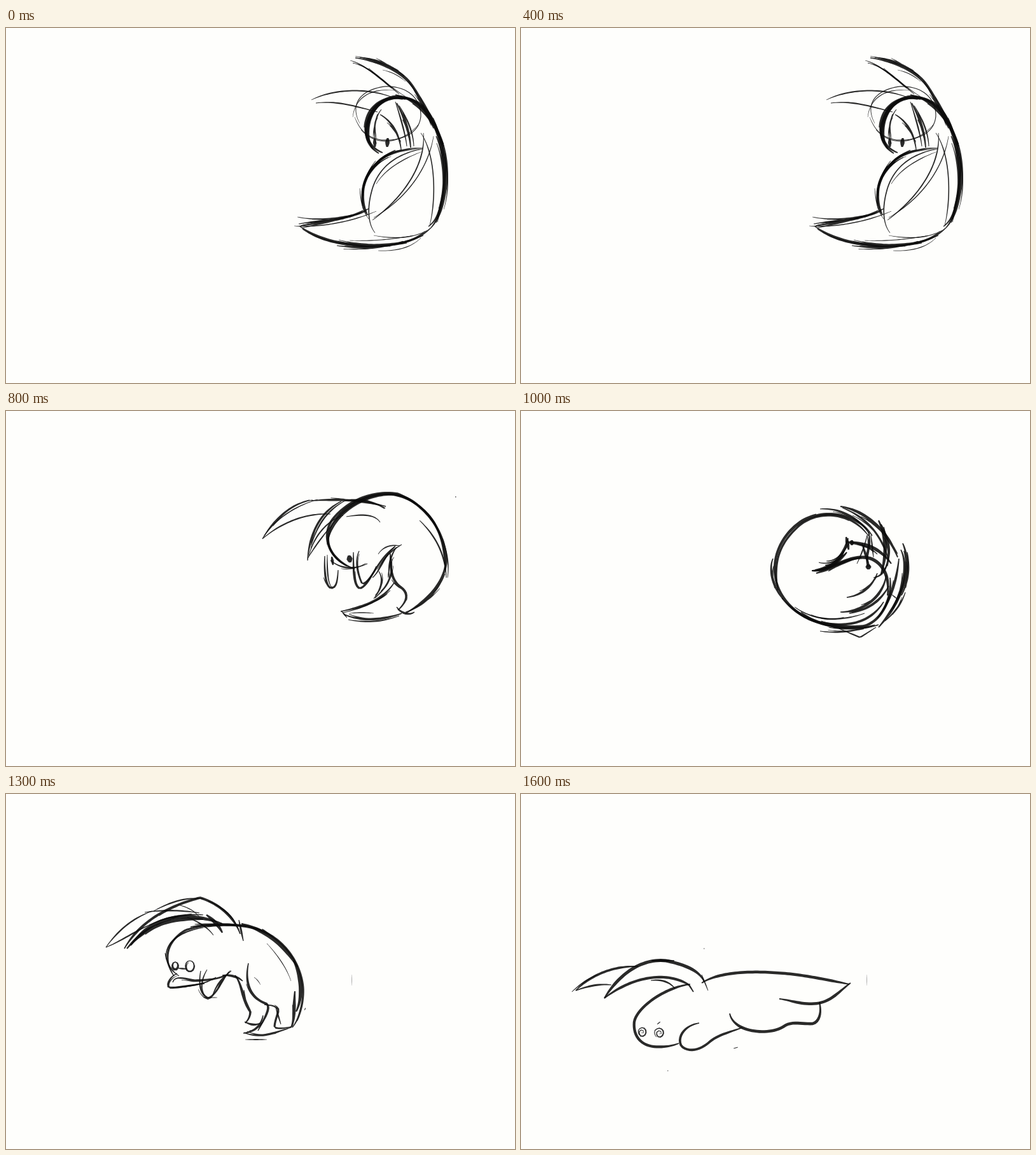
An HTML page for the animation above (2.1 s loop, 800x558 px).

```html
<!DOCTYPE html>
<html lang="en">
<head>
<meta charset="utf-8">
<title>Tumble sketch</title>
<style>
  html, body { margin: 0; height: 100%; overflow: hidden; background: #fefefc; }
  svg { display: block; width: 100%; height: 100%; }
  path { fill: #0b0b0b; fill-opacity: .87; }
</style>
</head>
<body>
<svg viewBox="0 0 800 558" preserveAspectRatio="none">
  <g id="stand" data-echoes="2">
    <!-- ears -->
    <path d="M549 47C575 50 612 62 634 86C650 105 670 140 687 182" stroke-width="2.8"/>
    <path d="M556 46C580 48 606 58 626 76" stroke-width="2.4"/>
    <path d="M541 51C560 56 580 72 606 95" stroke-width="1.6"/>
    <path d="M545 55C570 60 592 82 618 104" stroke-width="1.8"/>
    <path d="M592 66Q612 70 628 84" stroke-width="1"/>
    <path d="M570 63Q600 90 628 108" stroke-width="1.2"/>
    <path d="M632 83C650 108 662 138 672 158" stroke-width="2.2"/>
    <path d="M480 113C510 98 560 92 605 108" stroke-width="1.8"/>
    <path d="M487 118C520 114 545 122 584 132" stroke-width="1.8"/>
    <!-- head -->
    <path d="M592 196C566 186 560 160 570 136C580 114 604 106 628 112" stroke-width="3.8"/>
    <path d="M586 197C560 182 562 150 578 128C596 106 632 102 656 124C672 140 680 165 684 184" stroke-width="3.6"/>
    <path d="M576 190C560 160 574 116 610 108C640 106 662 126 676 160" stroke-width="3.2"/>
    <path d="M612 105C650 112 674 150 688 186" stroke-width="3.2"/>
    <path d="M556 150C540 120 556 98 594 92C630 90 652 110 652 138C650 166 622 178 590 176C566 172 556 160 548 140" stroke-width="1"/>
    <path d="M545 140C548 112 570 94 610 98" stroke-width="1"/>
    <path d="M558 160C580 186 620 184 648 152" stroke-width="1"/>
    <path d="M582 182C576 160 580 140 590 128" stroke-width="2.1"/>
    <path d="M588 136C606 146 618 166 621 191" stroke-width="2.8"/>
    <path d="M614 118C624 136 634 160 636 188" stroke-width="3.6"/>
    <path d="M618 122C632 145 640 165 641 186" stroke-width="2"/>
    <path d="M612 116C620 140 628 168 630 186" stroke-width="2"/>
    <path d="M600 173L599 187" stroke-width="6"/>
    <path d="M579 174L580 187" stroke-width="4.6"/>
    <!-- body -->
    <path d="M655 189C620 188 590 200 572 224C558 244 556 270 566 292" stroke-width="2.2"/>
    <path d="M622 192C592 196 568 222 562 250C558 272 566 288 568 294" stroke-width="3.4"/>
    <path d="M612 192C580 206 560 236 560 268" stroke-width="2.8"/>
    <path d="M556 252Q558 285 570 300" stroke-width="1.2"/>
    <path d="M655 190C620 196 588 214 576 252C566 285 570 310 580 322" stroke-width="1.5"/>
    <path d="M652 195Q600 215 582 245" stroke-width="1.2"/>
    <path d="M656 165C660 210 630 262 576 302" stroke-width="1.6"/>
    <path d="M672 170C664 220 630 268 578 298" stroke-width="1.2"/>
    <path d="M656 128C690 165 698 220 690 258C686 282 680 300 668 314" stroke-width="3.4"/>
    <path d="M664 135C688 180 696 230 684 275C680 296 672 306 664 312" stroke-width="3"/>
    <path d="M676 170C690 200 694 250 676 306" stroke-width="2.8"/>
    <path d="M652 165C676 200 676 270 666 310" stroke-width="1.4"/>
    <path d="M684 190C698 220 696 260 688 285" stroke-width="1.2"/>
    <!-- tail -->
    <path d="M458 297Q500 306 560 290" stroke-width="1.5"/>
    <path d="M463 311C500 305 540 300 570 284" stroke-width="3"/>
    <path d="M460 308C490 302 535 302 566 288" stroke-width="2.2"/>
    <path d="M453 311C490 314 540 306 582 288" stroke-width="1.3"/>
    <path d="M461 311C500 340 560 346 620 338C640 334 655 326 668 314" stroke-width="3"/>
    <path d="M466 316C500 340 560 350 630 338" stroke-width="2.1"/>
    <path d="M520 342C560 348 610 346 656 326" stroke-width="2.4"/>
    <path d="M540 334Q590 336 640 326" stroke-width="1"/>
    <path d="M585 350Q630 352 652 330" stroke-width="1"/>
    <path d="M578 326Q630 336 662 318" stroke-width="1.2"/>
  </g>

  <g id="tuck" data-echoes="1">
    <!-- ears -->
    <path d="M403 201C420 172 448 144 482 140" stroke-width="2.4"/>
    <path d="M403 201C432 176 470 160 510 162" stroke-width="1.9"/>
    <path d="M406 196Q435 155 490 139" stroke-width="1.4"/>
    <path d="M480 141C520 138 560 140 597 150" stroke-width="3"/>
    <path d="M535 140C560 138 580 144 596 153" stroke-width="3"/>
    <path d="M474 235C476 200 490 160 527 142" stroke-width="2.8"/>
    <path d="M476 228C484 195 506 172 530 164" stroke-width="1.8"/>
    <path d="M480 210C490 178 505 155 535 140" stroke-width="2"/>
    <path d="M474 232Q490 205 512 180" stroke-width="1.8"/>
    <path d="M535 166C560 162 580 162 588 175" stroke-width="1.9"/>
    <!-- head and back -->
    <path d="M548 248C510 236 494 200 512 172C540 135 585 125 615 130C655 145 690 185 692 235C690 270 660 300 628 318" stroke-width="3.2"/>
    <path d="M536 244C500 224 498 190 524 164C560 130 610 118 645 146C676 170 690 200 690 250" stroke-width="2.8"/>
    <path d="M505 210C510 160 570 128 610 132C650 140 676 170 684 200" stroke-width="2.4"/>
    <path d="M650 172Q690 210 692 262" stroke-width="2"/>
    <path d="M686 200Q698 235 694 262" stroke-width="1.5"/>
    <path d="M690 256C676 290 650 310 628 316" stroke-width="2.2"/>
    <path d="M539 227L541 238" stroke-width="8"/>
    <path d="M512 229L514 242" stroke-width="4"/>
    <path d="M510 235Q535 255 568 240" stroke-width="2.2"/>
    <!-- limbs -->
    <path d="M501 228C500 250 502 275 510 278C520 280 521 265 522 250" stroke-width="2.8"/>
    <path d="M505 226Q504 270 512 277" stroke-width="1.8"/>
    <path d="M546 222C546 250 546 275 556 279C566 276 576 258 582 244" stroke-width="2.8"/>
    <path d="M555 220C548 235 552 255 560 272C575 268 585 232 610 214" stroke-width="2.4"/>
    <path d="M576 262C588 252 592 230 612 212" stroke-width="2.4"/>
    <path d="M590 240Q600 222 622 210" stroke-width="2"/>
    <path d="M585 225Q596 208 620 212" stroke-width="1.6"/>
    <path d="M586 252C594 265 590 280 578 295" stroke-width="2.4"/>
    <path d="M604 224C604 250 606 268 622 278C634 288 630 300 616 313" stroke-width="3.4"/>
    <path d="M606 232C608 262 600 275 580 294" stroke-width="2.4"/>
    <path d="M614 214Q600 232 602 262" stroke-width="2.4"/>
    <path d="M614 308C620 318 634 322 642 316" stroke-width="3"/>
    <!-- tail -->
    <path d="M610 270C590 300 560 308 526 315" stroke-width="3"/>
    <path d="M604 282Q580 305 530 317" stroke-width="1.8"/>
    <path d="M527 314L536 325" stroke-width="1.8"/>
    <path d="M532 320C555 330 590 330 622 318" stroke-width="3.2"/>
    <path d="M538 328Q580 336 618 322" stroke-width="2"/>
    <path d="M540 318Q560 316 578 318" stroke-width="1.4"/>
    <path d="M706 135h1.5" stroke-width="1.5"/>
  </g>

  <g id="ball" data-echoes="1">
    <!-- outline -->
    <path d="M552 196C530 162 480 152 444 172C408 194 394 232 400 262C404 290 428 318 460 330C500 340 545 340 570 300" stroke-width="3.2"/>
    <path d="M546 196C520 160 474 154 440 178C404 208 396 240 404 282" stroke-width="2.8"/>
    <path d="M396 232C388 250 398 280 412 296" stroke-width="3.4"/>
    <path d="M410 294C440 330 490 346 540 338C570 328 584 290 580 262" stroke-width="3.5"/>
    <path d="M440 316C470 340 520 348 562 336" stroke-width="3.4"/>
    <path d="M430 308C460 330 500 332 540 318" stroke-width="1.8"/>
    <path d="M456 320Q480 332 508 324" stroke-width="1.6"/>
    <path d="M470 346Q510 352 556 336" stroke-width="2.1"/>
    <path d="M500 342L533 356L558 340" stroke-width="2"/>
    <path d="M470 154C500 152 530 166 548 194" stroke-width="2.6"/>
    <path d="M502 150C540 156 575 186 592 230" stroke-width="4"/>
    <path d="M505 152C540 166 565 190 578 235" stroke-width="2.6"/>
    <path d="M562 172C575 200 575 225 566 256" stroke-width="4.8"/>
    <path d="M566 178C582 210 580 230 572 250" stroke-width="3.6"/>
    <path d="M600 208C614 240 606 290 562 340" stroke-width="4"/>
    <path d="M597 218C608 240 604 280 580 316" stroke-width="3.6"/>
    <path d="M607 222C612 250 606 275 598 290" stroke-width="3"/>
    <path d="M594 232C590 270 580 300 560 326" stroke-width="3.4"/>
    <path d="M604 285Q596 310 572 330" stroke-width="2.4"/>
    <!-- folds -->
    <path d="M512 293C535 290 552 276 560 255" stroke-width="3.2"/>
    <path d="M502 316C540 316 570 290 574 258" stroke-width="3.6"/>
    <path d="M516 318Q560 310 578 275" stroke-width="3.4"/>
    <path d="M582 288l10 8" stroke-width="1.4"/>
    <path d="M457 251C485 252 505 235 514 200" stroke-width="4.6"/>
    <path d="M458 251C485 252 520 222 550 232C570 240 580 262 576 290" stroke-width="4.4"/>
    <path d="M464 255C490 248 505 235 535 230" stroke-width="4.4"/>
    <path d="M462 250C484 246 500 238 512 222" stroke-width="4.4"/>
    <path d="M468 238Q490 244 512 222" stroke-width="2"/>
    <path d="M480 236Q502 236 516 206" stroke-width="2.2"/>
    <path d="M511 198L515 218" stroke-width="5"/>
    <path d="M512 206C540 206 565 216 582 240" stroke-width="4.4"/>
    <path d="M516 208Q545 210 560 225" stroke-width="2.4"/>
    <path d="M546 190C552 210 540 225 545 246" stroke-width="3.4"/>
    <path d="M536 208L548 246" stroke-width="3.4"/>
    <path d="M546 241v8" stroke-width="8"/>
    <path d="M520 203v8" stroke-width="6"/>
    <path d="M550 195L554 230" stroke-width="2"/>
    <path d="M528 240Q540 215 544 195" stroke-width="1.8"/>
    <path d="M554 262Q570 260 575 240" stroke-width="2.6"/>
  </g>

  <g id="leap" data-echoes="1">
    <!-- ears -->
    <path d="M157 241C172 220 195 196 230 184" stroke-width="2"/>
    <path d="M157 241C180 232 205 214 230 204" stroke-width="2"/>
    <path d="M186 243C205 210 240 180 305 163C335 172 360 195 368 220" stroke-width="3.4"/>
    <path d="M190 243C225 200 270 195 310 197" stroke-width="4.5"/>
    <path d="M196 238C230 192 280 182 340 204" stroke-width="4.5"/>
    <path d="M218 186Q260 180 304 187" stroke-width="2"/>
    <path d="M232 184Q275 160 310 165" stroke-width="2"/>
    <path d="M225 206C250 194 280 188 310 190" stroke-width="2.4"/>
    <path d="M318 168Q354 184 364 210" stroke-width="2"/>
    <path d="M270 174Q295 180 304 194" stroke-width="1.2"/>
    <path d="M315 190Q332 202 340 218" stroke-width="5"/>
    <path d="M285 194Q314 205 326 222" stroke-width="1.8"/>
    <path d="M366 198L373 231" stroke-width="2.6"/>
    <!-- head and back -->
    <path d="M264 286C246 260 252 232 282 214C320 202 370 202 400 214C440 230 464 268 467 305C468 330 460 355 450 367" stroke-width="2.8"/>
    <path d="M370 204C410 214 440 240 458 272" stroke-width="5.2"/>
    <path d="M452 262C470 300 462 330 456 342" stroke-width="5"/>
    <path d="M454 310C452 340 454 355 448 367" stroke-width="4.5"/>
    <path d="M410 235Q438 265 448 294" stroke-width="1"/>
    <path d="M252 260C248 236 270 216 310 210" stroke-width="2"/>
    <path d="M250 250Q254 275 272 286" stroke-width="2"/>
    <path d="M290 209Q330 202 378 208" stroke-width="3.4"/>
    <path d="M469 340l2-4" stroke-width="1"/>
    <path d="M266 264c-6 0-6 12 0 12s6-12 0-12" stroke-width="3.4"/>
    <path d="M289 262c-9 0-9 17 0 17s9-17 0-17" stroke-width="2.4"/>
    <path d="M271 274L284 275" stroke-width="2"/>
    <!-- arms -->
    <path d="M269 282C256 288 252 300 256 304C268 306 290 300 312 298" stroke-width="2.8"/>
    <path d="M262 296C265 285 280 290 296 293C320 293 335 290 350 284" stroke-width="2.8"/>
    <path d="M262 304Q310 302 330 288" stroke-width="2"/>
    <path d="M306 278C302 300 306 316 318 321C330 316 338 296 350 280" stroke-width="2.4"/>
    <path d="M316 276Q302 300 312 316" stroke-width="1.8"/>
    <path d="M325 316Q332 295 354 278" stroke-width="2.4"/>
    <path d="M340 285C354 284 366 288 372 294" stroke-width="3.4"/>
    <path d="M310 320h22" stroke-width="1.2"/>
    <!-- legs and tail -->
    <path d="M360 285C372 300 370 320 384 342Q384 352 376 360" stroke-width="4"/>
    <path d="M375 358Q390 366 400 360" stroke-width="3"/>
    <path d="M381 266C374 300 386 322 410 330C416 336 408 350 396 372" stroke-width="3.2"/>
    <path d="M406 331Q426 332 428 340C426 350 422 358 422 367Q430 370 448 366" stroke-width="2.8"/>
    <path d="M424 336L432 362" stroke-width="2"/>
    <path d="M404 348C400 368 388 374 373 376" stroke-width="3"/>
    <path d="M374 375C400 386 425 374 448 367" stroke-width="2.8"/>
    <path d="M376 386H410" stroke-width="1.6"/>
    <path d="M390 288Q396 292 400 300" stroke-width=".8"/>
  </g>

  <g id="lie" data-echoes="0">
    <!-- ears -->
    <path d="M80 311Q100 292 120 284" stroke-width="1.6"/>
    <path d="M86 309C110 284 145 270 184 271" stroke-width="3.2"/>
    <path d="M86 309C105 302 122 298 142 300" stroke-width="2.6"/>
    <path d="M131 321C155 282 190 258 228 262C255 268 280 276 288 295" stroke-width="4.4"/>
    <path d="M131 321C170 290 225 276 264 300L271 311" stroke-width="3.6"/>
    <path d="M205 262h36" stroke-width="3.4"/>
    <path d="M204 293Q230 290 242 306" stroke-width="2.4"/>
    <path d="M284 284L294 309" stroke-width="1.5"/>
    <!-- body -->
    <path d="M266 299C225 304 182 336 178 358C176 378 186 394 208 397Q230 399 248 392" stroke-width="3.7"/>
    <path d="M284 297C310 280 360 278 400 281C440 283 480 292 516 299" stroke-width="3.9"/>
    <path d="M518 297C500 310 488 326 466 329C440 332 425 324 406 322" stroke-width="3.9"/>
    <path d="M469 327C474 350 465 360 458 361C440 362 425 356 412 366C395 376 365 376 345 366C335 360 330 354 328 345" stroke-width="4"/>
    <path d="M280 360C255 364 245 384 252 396C262 406 280 404 296 390C310 378 330 374 348 367" stroke-width="3.3"/>
    <!-- dizzy eyes -->
    <path d="M189 375q3 3 4-1q-2-6-7-1q-1 8 5 8q7-2 5-10q-4-7-11-1q-2 5 1 9" stroke-width="1.8"/>
    <path d="M217 377q3 2 4-2q-3-6-8 0q0 8 6 7q7-3 4-11q-6-6-13 1q-1 6 3 10" stroke-width="1.8"/>
    <path d="M214 362l5-4" stroke-width="1.2"/>
    <path d="M334 400l7-2" stroke-width="1"/>
    <path d="M230 435h1.5" stroke-width="1"/>
    <path d="M287 243h1.5" stroke-width="1"/>
  </g>
  <path id="tick" d="M543.5 284v17" stroke-width="1" style="fill:#aaa"/>
</svg>
<script>
const LOOP = 2100, BOLD = 1.15;
const find = id => document.getElementById(id);
const poses = ['stand', 'tuck', 'ball', 'leap', 'lie'].map(find);
const tick = find('tick');

const spin = (x, y, angle, px, py) =>
  `translate(${x} ${y}) rotate(${angle}) translate(${-px} ${-py})`;

// Start time, pose, placement
const steps = [
  [0, 'stand', ''],
  [100, 'stand', 'translate(-1 0)'],
  [200, 'stand', 'translate(1 0)'],
  [300, 'stand', 'translate(-1 0)'],
  [400, 'stand', ''],
  [700, 'stand', spin(630, 312, -12, 630, 320) + 'translate(0 32) scale(1 .9)'],
  [800, 'tuck', ''],
  [900, 'ball', spin(552, 240, 70, 490, 250)],
  [1000, 'ball', ''],
  [1100, 'ball', spin(391, 263, -162.7, 546, 246)],
  [1200, 'ball', spin(310, 278, -325.4, 490, 250)],
  [1300, 'leap', ''],
  [1400, 'leap', spin(325, 335, -8, 350, 280)],
  [1500, 'lie', 'translate(5 123) scale(1 .8)'],
  [1600, 'lie', '']
];

let seed = 7;
const random = () => (seed = seed * 16807 % 2147483647) / 2147483647;

// Outline of a mark with thin ends along part of a path; shift moves it sideways.
function mark(path, width, from, to, shift) {
  const total = path.getTotalLength(), length = to - from;
  const count = Math.max(4, Math.ceil(length / 4)), left = [], right = [];
  for (let i = 0; i <= count; i++) {
    const s = length * i / count, at = from + s;
    const p = path.getPointAtLength(at);
    const a = path.getPointAtLength(Math.max(0, at - 1));
    const b = path.getPointAtLength(Math.min(total, at + 1));
    const run = Math.hypot(b.x - a.x, b.y - a.y) || 1;
    const nx = (a.y - b.y) / run, ny = (b.x - a.x) / run;
    const edge = Math.min(s, length - s) / Math.min(30, length * .4);
    const half = width / 2 * (.4 + .6 * Math.min(1, edge));
    const off = shift * (1 - 1.5 * i / count);
    left.push(`${p.x + nx * (off + half)} ${p.y + ny * (off + half)}`);
    right.unshift(`${p.x + nx * (off - half)} ${p.y + ny * (off - half)}`);
  }
  return `M${left.concat(right).join('L')}Z`;
}

// Replaces a centre line with a brush mark; long heavy lines get loose echoes.
function brush(path) {
  const length = path.getTotalLength();
  const width = path.getAttribute('stroke-width') * BOLD;
  const echoes = width > 2.4 && length > 40 ? path.parentNode.dataset.echoes : 0;
  let shape = mark(path, width, 0, length, 0);
  for (let i = 0; i < echoes; i++) {
    const from = length * random() * .4, to = length * (.65 + random() * .35);
    const side = random() < .5 ? -1 : 1;
    shape += mark(path, width * .55, from, to, side * (2 + random() * 2));
  }
  path.setAttribute('d', shape);
}

function draw(now) {
  const t = now % LOOP;
  const [, name, place] = steps.findLast(step => step[0] <= t);
  for (const pose of poses) {
    pose.style.visibility = pose.id === name ? 'visible' : 'hidden';
    if (pose.id === name) pose.setAttribute('transform', place);
  }
  tick.style.visibility = t >= 1200 ? 'visible' : 'hidden';
}

document.querySelectorAll('path').forEach(brush);
const start = performance.now();
function loop() {
  draw(performance.now() - start);
  requestAnimationFrame(loop);
}
loop();
</script>
</body>
</html>
```
